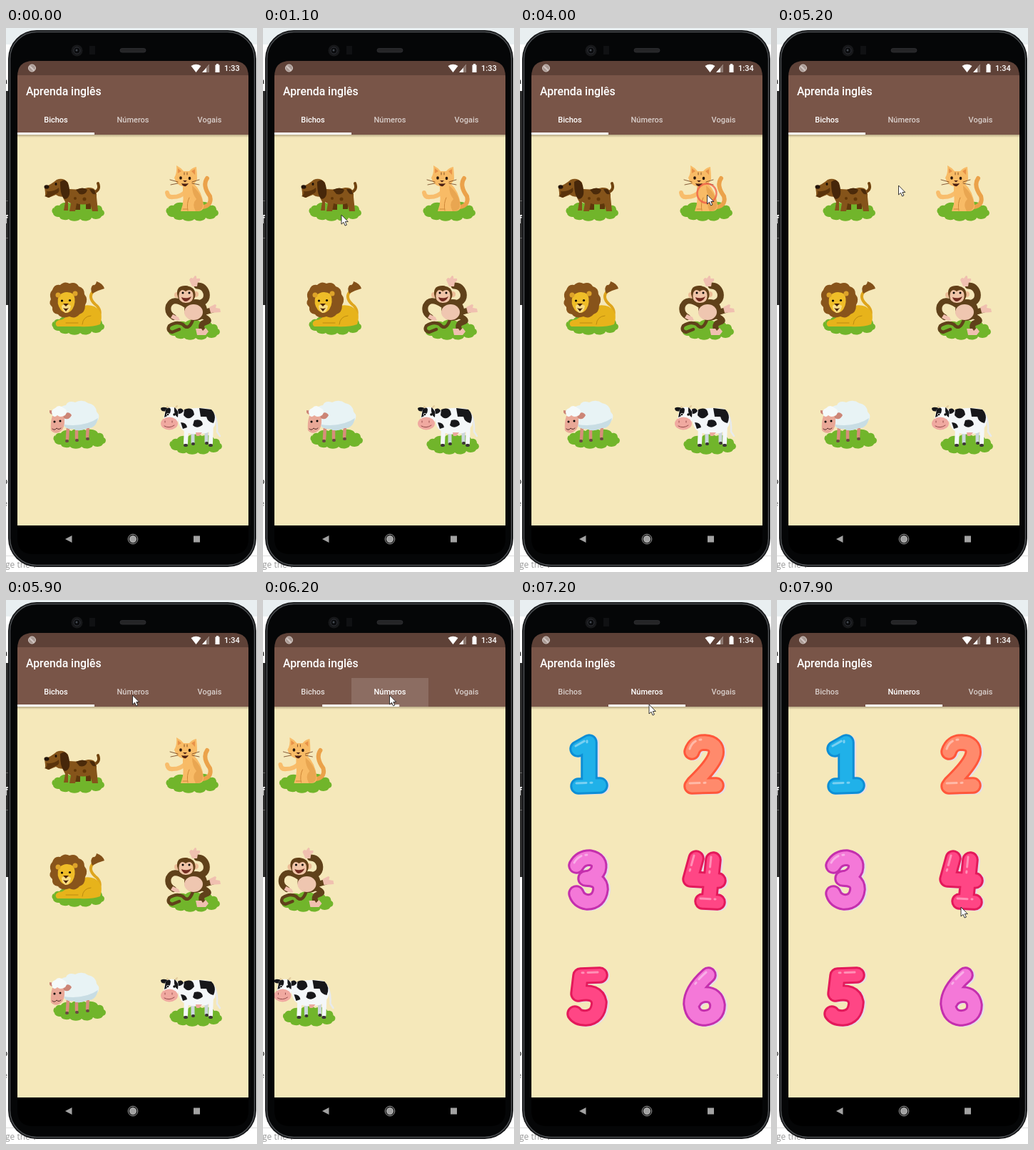
These frames come from a looping animation (352 px wide and 760 px high, 8 s). An HTML page:

```html
<!DOCTYPE html>
<html lang="pt">
<head>
<meta charset="utf-8">
<title>Aprenda inglês</title>
<style>
html, body { margin: 0; width: 100%; height: 100%; overflow: hidden; background: #fff; }
svg { display: block; width: 352px; height: 760px; }
text { font: 500 11px Roboto, sans-serif; fill: #fff; }
.tab { text-anchor: middle; }
.line { fill: none; stroke-linecap: round; stroke-linejoin: round; }
</style>
</head>
<body>
<svg viewBox="0 0 352 760">
<defs>
  <clipPath id="screen"><path d="M16 695V68Q16 46 38 46H318Q340 46 340 68V695Z"/></clipPath>
  <linearGradient id="shade" x2="0" y2="1">
    <stop stop-color="#7a6a50" stop-opacity=".5"/><stop offset="1" stop-color="#7a6a50" stop-opacity="0"/>
  </linearGradient>
  <path id="grass" fill="#71b52b" d="M4 10a6 5 0 0 1 8-5a10 7 0 0 1 15-3a12 7 0 0 1 20-1a11 7 0 0 1 17 4a6 6 0 0 1 8 6a6 5 0 0 1-1 9a8 5 0 0 1-14 2a9 6 0 0 1-16 2a9 5 0 0 1-16 0a8 5 0 0 1-13-3a8 5 0 0 1-9-5a5 5 0 0 1 1-8Z"/>
</defs>

<!-- desktop behind the phone -->
<path fill="#e9eff1" d="M0 0H352V23H0Z"/>
<path fill="#2b2b2b" d="M0 88H6V387H0Z"/>
<path stroke="#666" d="M0 241.5H5M0 293.5H5"/>
<path stroke="#ddd" d="M0 737.5H352"/>
<text x="-4" y="78" style="fill:#333">a</text>
<text x="-3" y="273" style="font-size:17px">f</text>
<text x="-4" y="637" style="fill:#333">o</text>
<text x="-4" y="668" style="fill:#888">e</text>
<text x="-1" y="754" style="font:12px 'Open Sans',sans-serif;fill:#999">ge the v</text>

<!-- phone -->
<rect x="3" y="3" width="348" height="750" rx="40" fill="#131416"/>
<rect x="5.500" y="5.500" width="343" height="745" rx="37.500" fill="#050607" stroke="#4b4e51" stroke-width="1.500"/>
<rect x="160" y="28.5" width="36" height="5.5" rx="2.7" fill="#252527" stroke="#343438" stroke-width=".7"/>
<circle cx="99.500" cy="31.500" r="8" fill="#17181a"/>
<circle cx="99.500" cy="31.500" r="4.500" fill="#0a0b0d" stroke="#303238"/>
<circle cx="99" cy="31" r="1.500" fill="#444a52"/>
<path fill="#101113" d="M117 25h8v12h-8Z"/>
<path d="M16 695H340V713Q340 735 318 735H38Q16 735 16 713Z"/>
<g fill="#a2a2a2">
  <path d="M83 714L92.500 709V719Z"/>
  <circle cx="178" cy="714" r="5.200"/>
  <circle cx="178" cy="714" r="6.800" fill="none" stroke="#a2a2a2"/>
  <path d="M263 709.500h9v9h-9Z"/>
</g>

<g clip-path="url(#screen)">
  <path fill="#f5e8ba" d="M16 149H340V695H16Z"/>
  <g id="pager">
    <!-- dog -->
    <use href="#grass" x="63" y="243"/>
    <path class="line" stroke="#70430f" stroke-width="4" d="M122 230Q133 227 129 217"/>
    <path fill="#5d370b" d="M97 240h7v14h-8ZM112 240h7v13h-7Z"/>
    <path fill="#85541a" d="M80 223Q98 228 115 223Q128 222 127 236L129 256H121L118 245Q107 248 99 245L97 256H89L91 245L87 243V255H81L83 243Q77 234 80 223Z"/>
    <path fill="#4b2a0a" d="M98 226Q108 221 114 226Q112 234 103 232ZM117 225Q125 223 126 232Q121 234 117 225Z"/>
    <circle cx="110" cy="239" r="2.500" fill="#613708"/><circle cx="97" cy="238" r="2" fill="#613708"/>
    <path fill="#85541a" d="M54 222Q63 219 71 212Q80 208 87 216Q90 230 83 235Q75 237 70 233L60 237Q54 236 55 230Z"/>
    <path fill="#5a330b" d="M57 228Q68 229 74 223Q76 231 69 232L60 237L54 235Q59 232 57 228Z"/>
    <path fill="#46270a" d="M76 215Q84 208 88 220Q92 237 83 239Q76 237 76 215Z"/>
    <ellipse cx="57" cy="222" rx="3.500" ry="2.800" fill="#241409"/>
    <ellipse cx="70" cy="218" rx="1.500" ry="2" fill="#1d1007"/>

    <!-- cat -->
    <use href="#grass" x="223" y="243"/>
    <g class="line" stroke="#f4b058" stroke-width="6">
      <path stroke="#eba24a" d="M270 251Q290 250 286 235Q275 220 282 210"/>
      <path stroke="#f8bd6c" d="M252 228Q246 236 234 236Q227 237 226 230"/>
    </g>
    <path fill="#f8bb66" d="M248 218L263 217Q275 228 277 247Q278 257 267 256H245Q250 244 248 232Z"/>
    <path fill="#e9a651" d="M261 220Q278 235 276 250Q274 256 266 256Q260 246 267 239Q261 232 261 220Z"/>
    <path fill="#f8bb66" d="M236 209Q240 203 239 192Q245 195 249 200L257 200Q261 195 267 194Q268 204 268 211Q264 222 252 222Q239 221 236 209Z"/>
    <path fill="#e89248" d="M241 203V196L246 200ZM260 200L265 197V205Z"/>
    <path class="line" stroke="#6b3a18" stroke-width=".8" d="M241 215L230 212M241 217L231 219M261 215L271 212M261 217L271 219M250 202V205M254 202V205"/>
    <ellipse cx="245" cy="209.500" rx="1.800" ry="2.300" fill="#28160c"/>
    <ellipse cx="257.500" cy="210" rx="1.800" ry="2.300" fill="#28160c"/>
    <path fill="#4c2013" d="M248 213h6l-3 2.500ZM246 217Q250 218 256 217Q253 222 250 221Q247 220 246 217Z"/>
    <path class="line" stroke="#ce8738" d="M257 237Q253 245 255 255M248 253h6"/>

    <!-- lion -->
    <use href="#grass" x="63" y="402"/>
    <path class="line" stroke="#dea51d" stroke-width="4" d="M129 408Q136 394 125 386Q114 376 123 367"/>
    <path fill="#835019" d="M121 371Q117 363 122 359Q126 360 127 354Q136 357 138 364Q130 366 121 371Z"/>
    <path fill="#e7b31b" d="M90 394Q111 384 124 389Q138 397 132 414Q120 418 104 417H72Q66 412 74 408Q84 408 90 394Z"/>
    <path class="line" stroke="#bc8b10" d="M107 414Q108 403 119 402M84 412H101"/>
    <path fill="#88541b" d="M65 366Q68 357 76 359Q82 353 89 357Q98 354 102 361Q110 363 110 372Q116 379 111 387Q111 398 103 400Q97 407 89 403Q78 407 73 400Q64 399 65 390Q59 385 63 379Q60 371 65 366Z"/>
    <path fill="#efbd28" d="M74 374Q84 365 95 372Q99 384 93 393Q86 402 77 394Q70 385 74 374Z"/>
    <circle cx="73" cy="373" r="3.500" fill="#dda32a"/><circle cx="97" cy="371" r="3.500" fill="#dda32a"/>
    <path fill="#f9dc83" d="M78 388Q83 383 91 388Q90 398 83 398Q78 395 78 388Z"/>
    <circle cx="78.500" cy="381" r="1.600"/><circle cx="89.500" cy="380.500" r="1.600"/>
    <path fill="#472208" d="M80 385h8l-4 4ZM80 391Q84 393 88 391L84 396Z"/>

    <!-- monkey -->
    <use href="#grass" x="225" y="409"/>
    <g class="line" stroke="#60411a" stroke-width="8">
      <path stroke-width="4.500" d="M262 408Q256 424 248 414Q239 409 229 416Q225 423 233 425L243 421"/>
      <path stroke-width="9" d="M265 386Q284 384 281 370Q278 360 268 360"/>
      <path d="M252 387Q234 375 228 388Q225 398 235 404"/>
      <path d="M273 401Q290 409 280 411Q272 413 275 421M275 398L289 394"/>
    </g>
    <ellipse cx="266" cy="394" rx="16" ry="15" fill="#60411a"/>
    <ellipse cx="263" cy="397" rx="13" ry="11" fill="#efc6b0"/>
    <path fill="#f0c0b0" d="M257 352q2-5 5-2l3-4q3 0 2 4l5 0q1 4-3 5l-1 6h-7ZM234 400l8 4 2 5-7-1-6-3ZM285 390l8-4 2 1-1 4 6 1 1 5-14 1ZM266 420h8l2 3 4-4 4 5-4 5h-12Z"/>
    <circle cx="240" cy="373" r="4" fill="#edbd97"/><circle cx="266" cy="372" r="4" fill="#edbd97"/>
    <path fill="#634018" d="M240 372Q239 359 253 360Q268 362 265 376Q262 386 252 385Q242 384 240 372Z"/>
    <path fill="#f0c4a8" d="M243 370Q246 363 252 368Q259 363 262 370Q265 384 252 384Q240 383 243 370Z"/>
    <circle cx="248" cy="370" r="1.500"/><circle cx="257" cy="370" r="1.500"/>
    <path fill="#732b20" d="M246 376Q253 379 260 375Q257 382 251 382Q247 380 246 376Z"/>

    <!-- sheep -->
    <use href="#grass" x="65" y="561"/>
    <path class="line" stroke="#d88e7b" stroke-width="4.500" d="M87 558L86 574M99 558V573M115 556L114 571"/>
    <path class="line" stroke="#6a4740" stroke-width="4" d="M85 577h1M99 576h1M114 574h1"/>
    <path fill="#e8f3f5" d="M76 540Q73 528 84 527Q87 520 97 523Q107 518 115 524Q126 526 127 536Q134 543 127 550Q124 559 114 559Q103 565 94 560Q82 561 80 552Z"/>
    <path fill="#c8dde4" d="M129 545Q126 560 114 559Q103 565 94 560Q83 561 81 554Q110 558 129 545Z"/>
    <path fill="#e9a897" d="M65 542Q71 537 81 541Q84 553 79 561Q70 570 63 562Q62 551 65 542Z"/>
    <path fill="#cc8576" d="M67 540Q60 540 61 534L68 535ZM80 540Q88 534 92 541Q88 549 81 545Z"/>
    <path fill="#f5fafa" d="M65 541Q62 533 69 531Q74 525 81 531Q88 534 83 541Q76 545 72 541Q68 545 65 541Z"/>
    <circle cx="68" cy="550" r="1.500"/><circle cx="76" cy="549" r="1.500"/>
    <path class="line" stroke="#4f2a25" d="M65 560q3 3 6-1q3 3 6 0"/>

    <!-- cow -->
    <use href="#grass" x="228" y="569"/>
    <path class="line" stroke="#e7eaed" stroke-width="2.500" d="M292 540Q297 550 296 564L300 570"/>
    <path class="line" stroke="#ccd7de" stroke-width="5" d="M262 560V579M281 560V578"/>
    <path class="line" stroke="#f4f7f9" stroke-width="6" d="M253 558L252 580M288 552L287 580"/>
    <path class="line" stroke="#3b3436" stroke-width="4" d="M251 583h2M262 581h1M281 580h1M286 583h2"/>
    <path fill="#f4f7f9" d="M240 537Q261 528 286 532Q297 539 293 555Q286 568 272 567Q258 569 248 562Q241 556 240 537Z"/>
    <path fill="#17171a" d="M250 533Q263 528 264 540Q256 550 249 541ZM271 531L288 533Q296 541 291 552Q283 551 281 543L273 543ZM264 548Q275 545 276 554Q268 561 262 555ZM245 551Q253 551 254 558L248 560Z"/>
    <path fill="#ecaa9e" d="M266 565h9l-4 5h-4Z"/>
    <path fill="#17171a" d="M226 535Q217 537 217 531Q222 528 228 532ZM238 535Q246 528 249 535Q245 541 239 538Z"/>
    <path class="line" stroke="#e1c99b" stroke-width="2" d="M229 532l-3-3M237 531l3-3"/>
    <path fill="#f8fafb" d="M224 533Q232 526 241 533Q243 543 240 553H221Q221 541 224 533Z"/>
    <path fill="#17171a" d="M224 533Q230 528 231 533Q231 541 222 544ZM236 530Q243 534 241 544Q235 541 236 530Z"/>
    <ellipse cx="229" cy="552.500" rx="12" ry="9" fill="#f0a9a0"/>
    <circle cx="227" cy="540" r="2" fill="#fff"/><circle cx="227" cy="540" r="1.200"/><circle cx="236" cy="540" r="1.700"/>
    <path class="line" stroke="#954b4b" d="M223 549v2M233 549v2M222 556Q229 560 236 555"/>

    <g id="digits" transform="translate(324)"></g>
  </g>

  <path fill="url(#shade)" d="M16 149H340V153H16Z"/>
  <path fill="#795548" d="M16 66H340V149H16Z"/>
  <path fill="#5e4137" d="M16 46H340V66H16Z"/>
  <circle cx="36.500" cy="56" r="5" fill="#a99a94" stroke="#d4c9c5"/>
  <path class="line" stroke="#d4c9c5" stroke-width="2" d="M34 54L39 59"/>
  <path fill="#fff" d="M259.500 53Q266.500 48.500 273.500 53L266.500 62ZM275 62L285 51V62Z"/>
  <path fill="#8d7971" d="M281 55.500L285 51V62H281Z"/>
  <path fill="#fff" d="M293.500 51.500H295V50H298V51.500H299.500V62H293.500Z"/>
  <text id="clock" x="306" y="60"></text>
  <text x="28" y="94" style="font-size:15.800px">Aprenda inglês</text>
  <path id="press" fill="#fff" opacity=".14" d="M124 109H232V149H124Z"/>
  <text class="tab" id="tabA" x="70" y="132">Bichos</text>
  <text class="tab" id="tabB" x="178" y="132">Números</text>
  <text class="tab" x="285.500" y="132" opacity=".7">Vogais</text>
  <path id="bar" fill="#fff" d="M16 146H124V149H16Z"/>
</g>

<circle id="ring" fill="none" stroke="#ef5a45" stroke-width="2.500"/>
<path id="cursor" fill="#fff" stroke="#222" stroke-width=".9" stroke-linejoin="round" d="M0 0V13L3 10.200L5.100 15L7.400 14L5.300 9.500H9.300Z"/>
</svg>

<script>
const $ = id => document.getElementById(id);

// Centre line, rim colour, face colour
const pink = ['#c42fad', '#f478d8'], red = ['#e3195a', '#ff4685'];
const digits = [
  ['M81 208L97 199V259M82 260L112 259', '#0d8ed5', '#20b1e9'],
  ['M241 212Q245 199 259 199Q277 200 275 215Q272 229 243 257M241 260L275 259', '#ff573a', '#ff8a6c'],
  ['M79 371Q85 360 98 360Q114 363 110 377Q105 388 92 389Q113 389 113 404Q111 422 94 422Q82 420 79 410', ...pink],
  ['M247 361L239 390L278 392M271 363L265 421M256 421L277 422', ...red],
  ['M112 524L85 525L82 550Q108 545 111 562Q110 583 92 584Q81 584 77 578', ...red],
  ['M264 524Q240 545 240 564Q242 584 259 584Q277 582 277 566Q275 551 260 551Q248 552 243 562', ...pink]
];
const stroke = (d, colour, width, extra = '') =>
  `<path class="line" d="${d}" stroke="${colour}" stroke-width="${width}" ${extra}/>`;
$('digits').innerHTML = digits.map(([d, rim, face]) =>
  stroke(d, '#e6ddea', 23, 'transform="translate(2.500 1)"') +
  stroke(d, rim, 23.5) + stroke(d, face, 17.5) +
  stroke(d, '#fff', 3, 'opacity=".4" stroke-dasharray="14 6 2 900" transform="translate(-3 -4)"')
).join('');

// Pointer tip: time, x, y
const path = [
  [400, 266, 553], [1200, 103, 248], [1500, 103, 248], [1900, 122, 265],
  [3100, 122, 265], [3900, 262.5, 233], [4600, 262.5, 233], [5200, 170.5, 220],
  [5600, 177.5, 133], [6200, 177.5, 133], [6400, 181, 146], [7300, 181, 146], [7900, 258, 429]
];
const clicks = [[1300, 103, 247], [4000, 262, 231], [6000, 177, 131]];
const clamp = v => Math.min(1, Math.max(0, v));
const smooth = v => v * v * (3 - 2 * v);

function pointAt(t) {
  const i = Math.max(1, path.findIndex(k => k[0] >= t));
  const [a, b] = [path[i - 1], path[i]];
  const k = smooth(clamp((t - a[0]) / (b[0] - a[0])));
  return [a[1] + (b[1] - a[1]) * k, a[2] + (b[2] - a[2]) * k];
}
const show = (id, on) => $(id).setAttribute('visibility', on ? 'visible' : 'hidden');
const move = (id, x, y = 0) => $(id).setAttribute('transform', `translate(${x} ${y})`);

function draw(now) {
  const t = Math.floor(now % 8000 / 100) * 100;
  const swipe = 1 - (1 - clamp((t - 6100) / 300)) ** 2.4;
  move('pager', -324 * swipe);
  move('bar', 108 * swipe);
  show('digits', t >= 6300);
  show('press', t >= 6100 && t < 6400);
  $('tabA').setAttribute('opacity', 1 - .3 * swipe);
  $('tabB').setAttribute('opacity', t >= 6100 ? 1 : .7);
  $('clock').textContent = t < 3500 ? '1:33' : '1:34';

  show('cursor', t >= 400);
  move('cursor', ...pointAt(t));
  const click = clicks.find(c => t >= c[0] && t < c[0] + 200);
  show('ring', click);
  if (click) {
    const age = (t - click[0]) / 100;
    move('ring', click[1], click[2]);
    $('ring').setAttribute('r', 13.5 + 7 * age);
    $('ring').setAttribute('opacity', .75 - .4 * age);
  }
  requestAnimationFrame(() => draw(performance.now() - start));
}
const start = performance.now();
draw(0);
</script>
</body>
</html>
```
